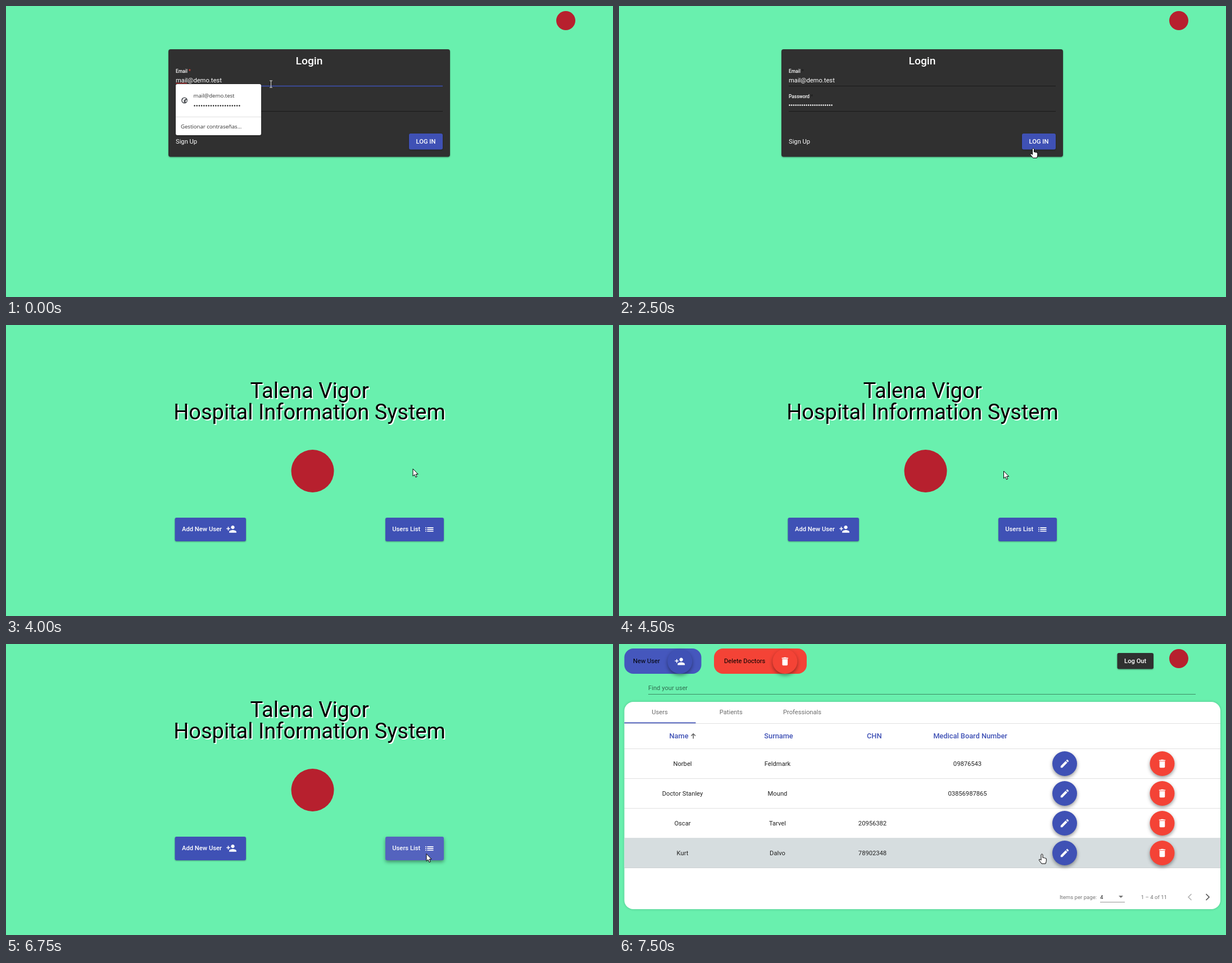
An HTML page for the animation above (8 s loop, 1080 px wide and 518 px high).

```html
<!DOCTYPE html>
<html lang="en">
<head>
<meta charset="utf-8">
<title>Hospital login</title>
<style>
  html, body { margin: 0; height: 100%; overflow: hidden; background: #69f0ae; }
  svg { display: block; width: 100%; height: 100%; font: 11.2px Roboto, sans-serif; }
  .mid { text-anchor: middle; }
  .bold { font-weight: 500; }
  .white { fill: #fff; }
  .blue { fill: #3f51b5; }
  .red { fill: #f44336; }
  .logo { fill: #b7202e; }
  .dark { fill: #303030; }
  .grey { fill: #0000008a; }
  .label { font-size: 8.4px; font-weight: 500; }
  .small { font-size: 9.6px; }
  .head { font-size: 12.8px; font-weight: 500; fill: #3f51b5; }
  .title { font-size: 38px; filter: drop-shadow(2px 2px 0 #fff); }
  .native { font: 9.6px "Open Sans", sans-serif; fill: #333; }
  .low { filter: drop-shadow(0 1px 1px #0005); }
  .high { filter: drop-shadow(0 3px 3px #0006); }
  .line { fill: none; stroke: #0000001f; }
  .dots { fill: none; stroke-linecap: round; stroke-width: 2.6; }
</style>
</head>
<body>
<svg viewBox="0 0 1080 518" preserveAspectRatio="none">
  <defs>
    <path id="person" d="M15 12c2.21 0 4-1.79 4-4s-1.79-4-4-4-4 1.79-4 4 1.79 4 4 4zm-9-2V7H4v3H1v2h3v3h2v-3h3v-2H6zm9 4c-2.67 0-8 1.34-8 4v2h16v-2c0-2.66-5.33-4-8-4z"/>
    <path id="list" d="M3 13h2v-2H3zm0 4h2v-2H3zm0-8h2V7H3zm4 4h14v-2H7zm0 4h14v-2H7zM7 7v2h14V7z"/>
    <path id="bin" d="M6 19c0 1.1.9 2 2 2h8c1.1 0 2-.9 2-2V7H6zM19 4h-3.5l-1-1h-5l-1 1H5v2h14z"/>
    <path id="pencil" d="M3 17.25V21h3.75L17.81 9.94l-3.75-3.75zM20.71 7.04c.39-.39.39-1.02 0-1.41l-2.34-2.34c-.39-.39-1.02-.39-1.41 0l-1.83 1.83 3.75 3.75z"/>
  </defs>

  <g id="login">
    <rect class="dark low" x="289" y="77" width="501" height="191.5" rx="4"/>
    <g class="white">
      <text class="mid bold" x="539.5" y="104" font-size="19.2">Login</text>
      <text class="label" x="302" y="118.500">Email <tspan id="star">*</tspan></text>
      <text x="302" y="135.500">mail@demo.test</text>
      <text class="label" x="302" y="164">Password <tspan fill="#191919">*</tspan></text>
      <text x="302" y="244.800">Sign Up</text>
    </g>
    <path id="emailLine" d="M302 142.500H777"/>
    <path d="M302 187.500H777" stroke="#1a1a1a"/>
    <path id="password" class="dots" d="M303.500 176.500H379.500" stroke="#fff" stroke-dasharray="0 3.75"/>
    <rect class="blue low" x="717" y="227" width="60" height="28.5" rx="3"/>
    <text class="mid bold white" x="747" y="245">LOG IN</text>
    <g id="popup">
      <path d="M302 137.500H322" stroke="#d33"/>
      <rect class="white low" x="302" y="139" width="152" height="91" rx="3"/>
      <rect id="suggestion" x="302" y="144" width="152" height="49" fill="#e8e8e9"/>
      <circle cx="317.5" cy="168" r="5.5" fill="#55585c"/>
      <path class="white" d="M313.500 167l3 2v3q-3-1-3-5zM316 164h4l-1 2-2 1-1 2-2-2zM319 169l3-2q0 3-2 4z"/>
      <text class="native" x="333.5" y="163.2">mail@demo.test</text>
      <path class="dots" d="M335.500 177.500H416" stroke="#222" stroke-dasharray="0 4.2"/>
      <path class="line" d="M302 197.500H454"/>
      <text class="native" x="311" y="217.8">Gestionar contraseñas...</text>
    </g>
  </g>

  <g id="status">
    <rect y="500" width="359" height="18" fill="#dee1e6"/>
    <text class="native" x="5" y="513">Esperando respuesta del servidor...</text>
  </g>

  <g id="home">
    <text class="title mid" x="540" y="130">Talena Vigor</text>
    <text class="title mid" x="540" y="168">Hospital Information System</text>
    <circle class="logo" cx="545.5" cy="260" r="38"/>
    <rect class="blue low" x="300.5" y="343" width="126.5" height="42" rx="3"/>
    <rect id="usersButton" x="675" y="343" width="104" height="42" rx="3"/>
    <g class="white bold">
      <text x="313" y="367">Add New User</text>
      <use href="#person" transform="translate(391.5 353.7) scale(.8)"/>
      <text x="687.3" y="367">Users List</text>
      <use href="#list" transform="translate(743.7 354.5) scale(.8)"/>
    </g>
  </g>

  <g id="users">
    <rect x="9.5" y="8" width="137" height="45" rx="16" fill="#4557bd"/>
    <rect class="red" x="169" y="8" width="165" height="45" rx="16"/>
    <text x="25" y="34">New User</text>
    <text x="187" y="34">Delete Doctors</text>
    <g id="topButtons"></g>
    <rect class="dark low" x="886.5" y="16" width="64.5" height="28.5" rx="3"/>
    <text class="mid bold white" x="918.7" y="33.5">Log Out</text>
    <text class="grey" x="52" y="81.7">Find your user</text>
    <path d="M52 89.500H1026" stroke="#0000006b"/>
    <rect class="white" x="9.5" y="103" width="1060.5" height="369" rx="16" style="filter:drop-shadow(0 0 2px #0003)"/>
    <g class="mid" fill="#00000094">
      <text x="72.5" y="125">Users</text>
      <text x="199.2" y="125">Patients</text>
      <text x="326" y="125">Professionals</text>
    </g>
    <path class="line" d="M9.500 141.500H1070M9.500 186.500H1070"/>
    <rect class="blue" x="9.5" y="139.5" width="127" height="1.7"/>
    <g class="head mid">
      <text x="106.5" y="168">Name</text>
      <text x="284" y="168">Surname</text>
      <text x="454.3" y="168">CHN</text>
      <text x="625" y="168">Medical Board Number</text>
    </g>
    <path d="M132.200 168.500V160M128.500 163.500L132.200 159.800L136 163.500" fill="none" stroke="#666" stroke-width="1.6"/>
    <g id="rows"></g>
    <g id="pageSize" class="small grey">
      <text x="806" y="453.5">Items per page:</text>
      <text x="878" y="453.5" fill="#222">4</text>
      <path d="M878 459.500H922" stroke="#0000006b"/>
      <path d="M911 448h8l-4 4z"/>
    </g>
    <text id="range" class="small grey" x="975" y="453.5" text-anchor="end"></text>
    <g fill="none" stroke-width="1.7">
      <path d="M1018.500 445L1013 450.500L1018.500 456" stroke="#b5b5b5"/>
      <path id="next" d="M1044.500 445L1050 450.500L1044.500 456"/>
    </g>
    <g id="spinner" class="blue"></g>
  </g>

  <circle id="smallLogo" class="logo" cx="996" cy="26" r="17"/>

  <g id="cursor" fill="#fff" stroke="#000" stroke-linejoin="round">
    <path id="beam" d="M-2.500 0H2.500M0 0V12M-2.500 12H2.500" stroke="#ddd"/>
    <path id="arrow" d="M0 0V13L3 10.300L5 15L7.200 14L5.200 9.500H9.200z"/>
    <path id="hand" d="M0 1.500Q1.500-1.200 3 1.500V7Q4.500 6 5.500 7.500Q7 6.500 7.700 8Q9.300 7.500 9.300 9.500V13L8 17.500H1L-3.500 11.500Q-4 9-1.500 10L0 11.500z"/>
  </g>
</svg>

<script>
const LOOP = 8000, STEP = 250;
const $ = id => document.getElementById(id);
const show = (id, on) => { $(id).style.display = on ? "" : "none"; };

const roundButton = (x, y, color, icon) =>
  `<circle class="${color} high" cx="${x}" cy="${y}" r="22"/>
   <use class="white" href="#${icon}" transform="translate(${x - 9.6} ${y - 9.6}) scale(.8)"/>`;

$("topButtons").innerHTML =
  roundButton(108.3, 31, "blue", "person") + roundButton(295.3, 31, "red", "bin");

const people = [
  ["Norbel", "Feldmark", "", "09876543"],
  ["Doctor Stanley", "Mound", "", "03856987865"],
  ["Oscar", "Tarvel", "20956382", ""],
  ["Kurt", "Dalvo", "78902348", ""],
];
$("rows").innerHTML = people.map((person, i) => {
  const y = 186.5 + 53 * i;
  const cells = person.map((text, col) =>
    `<text class="mid" x="${113 + 169 * col}" y="${y + 30}" fill="#222">${text}</text>`);
  const hover = i == 3 ? `<rect x="9.5" y="${y}" width="1060.5" height="53" fill="#d6dddf"/>` : "";
  return hover + `<path class="line" d="M9.5 ${y + 53}H1070"/>` + cells.join("") +
    roundButton(793, y + 26.5, "blue", "pencil") + roundButton(966.5, y + 26.5, "red", "bin");
}).join("");

$("spinner").innerHTML = [24, 39, 65, 95, 132, 171].map((angle, i) =>
  `<circle cx="543.5" cy="76.5" r="${2.5 - 0.2 * i}" transform="rotate(${-angle} 543.5 92.5)"/>`).join("");

// Pointer path: start time, shape, x, y
const track = [
  [0, "beam", 471.5, 133], [250, "arrow", 432, 158], [500, "arrow", 400, 165],
  [750, "arrow", 590, 215], [1000, "arrow", 838, 268], [1250, "hand", 752, 246],
  [1500, "hand", 745, 248], [1750, "hand", 739, 251], [2000, "hand", 735.5, 253],
  [2750, "arrow", 732.5, 252], [4000, "arrow", 724, 256], [4250, "arrow", 702, 260],
  [4500, "arrow", 684.5, 260], [4750, "arrow", 406, 342], [5000, "arrow", 440, 362],
  [5250, "arrow", 520, 371], [5500, "arrow", 600, 374], [5750, "arrow", 662, 374],
  [6000, "arrow", 748, 373.5], [7500, "hand", 751, 373.5],
];

function draw(t) {
  const suggesting = t < 750, listed = t >= 7000, loaded = t >= 7500, hover = t >= 6250;
  show("login", t < 2750);
  show("popup", suggesting);
  show("suggestion", t >= 250);
  show("password", !suggesting);
  $("star").setAttribute("fill", suggesting ? "#f44336" : "#191919");
  $("emailLine").setAttribute("stroke", suggesting ? "#3f51b5" : "#1a1a1a");
  $("emailLine").setAttribute("stroke-width", suggesting ? 1.6 : 1);

  show("status", t >= 2750 && t < 3250);
  show("home", t >= 3750 && !listed);
  $("usersButton").setAttribute("class", hover ? "high" : "low");
  $("usersButton").setAttribute("fill", hover ? "#5463be" : "#3f51b5");

  show("users", listed);
  show("smallLogo", t < 2750 || listed);
  show("rows", loaded);
  show("spinner", !loaded);
  $("spinner").setAttribute("transform", `rotate(${(t - 7000) / 2} 543.5 92.5)`);
  $("pageSize").setAttribute("transform", `translate(${loaded ? -22 : 0})`);
  $("range").textContent = loaded ? "1 – 4 of 11" : "0 of 0";
  $("next").setAttribute("stroke", loaded ? "#555" : "#b5b5b5");

  const [, shape, x, y] = track.findLast(point => point[0] <= t);
  for (const id of ["beam", "arrow", "hand"]) show(id, id == shape);
  $("cursor").setAttribute("transform", `translate(${x} ${y})`);
}

const start = performance.now();
function tick() {
  const t = (performance.now() - start) % LOOP;
  draw(Math.floor(t / STEP) * STEP);
  requestAnimationFrame(tick);
}
tick();
</script>
</body>
</html>
```
